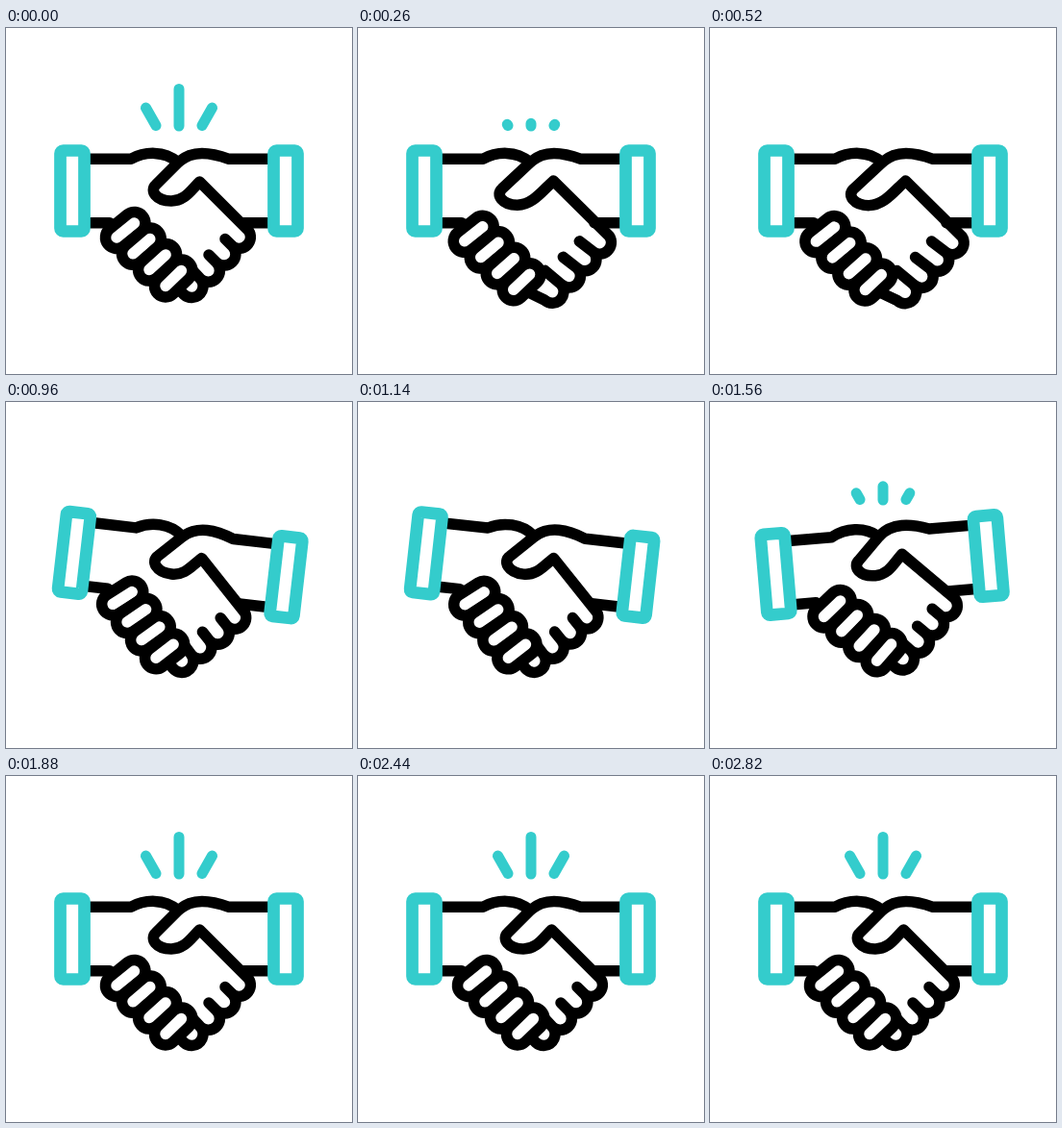
An HTML page for the animation above (3000 ms loop, 360 px wide and 360 px high).

```html
<!DOCTYPE html>
<html>
<head>
<meta charset="utf-8">
<style>
html, body { margin: 0; height: 100%; overflow: hidden; background: #fff; }
svg { display: block; width: 100vw; height: 100vh; }
path, rect { fill: none; stroke: #000; stroke-width: 11.5; stroke-linecap: round; stroke-linejoin: round; }
.teal { stroke: #34cccc; }
#rays { stroke-width: 11; }
rect { stroke-width: 12.7; }
#fingers path { fill: #fff; }
</style>
</head>
<body>
<svg viewBox="0 0 360 360">
  <path id="rays" class="teal"/>
  <g id="shake">
    <path d="M88 136.3H130C145 128 165 128 178 139M88 202.7H108M272 136.3H232C212 129 194 127 180 139M272 202.7H246"/>
    <path id="palm"/>
    <g id="fingers"><path/><path/><path/><path/></g>
    <rect class="teal" x="56.5" y="127.5" width="25" height="84" rx="3"/>
    <rect class="teal" x="278.5" y="127.5" width="25" height="84" rx="3"/>
  </g>
</svg>
<script>
const LOOP = 3000;
const $ = id => document.getElementById(id);
const fingers = [...$('fingers').children];
const ramp = (t, a, b) => Math.min(1, Math.max(0, (t - a) / (b - a)));
const ease = p => (1 - Math.cos(Math.PI * p)) / 2;

function drawRays(t) {
  const len = 1 - ramp(t, 10, 280) + ramp(t, 1464, 1728);
  const ray = (x, y, dx, dy) => `M${x} ${y}l${dx * len} ${dy * len}`;
  $('rays').setAttribute('d', len < 0.01 ? '' :
    ray(180, 102, 0, -38.5) + ray(156, 101.5, -10.5, -18.5) + ray(204, 101.5, 10.5, -18.5));
}

// open: 0 = firm grip, 1 = fingers spread
function drawHands(open) {
  const at = (x, y, dx, dy) => `${x + dx * open} ${y + dy * open} `;
  const out = (x, y) => at(x, y, 9.5, 6);
  const thumb = (x, y) => at(x, y, -6.5, 4.5);
  const knuckle = (x, y) => 'A11.9 11.9 0 0 1 ' + out(x, y);

  $('palm').setAttribute('d',
    'M180 139L' + thumb(156, 163) +
    'C' + thumb(149, 169) + thumb(156, 180) + thumb(172, 180) +
    'C' + at(186, 180, -4, 4) + at(192, 169, 0, 0) + at(201.5, 160, 2, -1) +
    'L' + out(252.5, 211) + knuckle(236, 227.4) + knuckle(219, 244) + knuckle(202, 260.7) +
    knuckle(193.5, 280.5) + knuckle(185, 277.3) + 'L' + at(178, 270, -3, 4) +
    'M' + at(228, 219.5, 2.5, 2.5) + 'L' + out(236, 227.4) +
    'M' + at(211, 236, 2.5, 2.5) + 'L' + out(219, 244) +
    'M' + at(192, 250, 2.5, 2.5) + 'L' + out(202, 260.7));

  fingers.forEach((finger, i) => {
    const ax = 115 + 17 * i - 4.5 * open, ay = 218 + 16.8 * i + 4 * open;
    const bx = 133.5 + 16.3 * i - 4 * open, by = 203 + 16.5 * i + 4 * open;
    const r = 11.5, d = Math.hypot(bx - ax, by - ay);
    const nx = (by - ay) / d * r, ny = (ax - bx) / d * r;
    finger.setAttribute('d',
      `M${ax + nx} ${ay + ny}L${bx + nx} ${by + ny}A${r} ${r} 0 0 1 ${bx - nx} ${by - ny}` +
      `L${ax - nx} ${ay - ny}A${r} ${r} 0 0 1 ${ax + nx} ${ay + ny}Z`);
  });
}

function frame(now) {
  const t = now % LOOP;
  drawRays(t);
  drawHands(1.3 * (ease(ramp(t, 0, 400)) - ease(ramp(t, 400, 800))));
  const angle = 8 * ease(ramp(t, 680, 1070)) - 16 * ramp(t, 1078, 1678) + 8 * ramp(t, 1678, 1865);
  $('shake').setAttribute('transform', `rotate(${angle} 180 180)`);
  requestAnimationFrame(frame);
}
frame(0);
</script>
</body>
</html>
```
